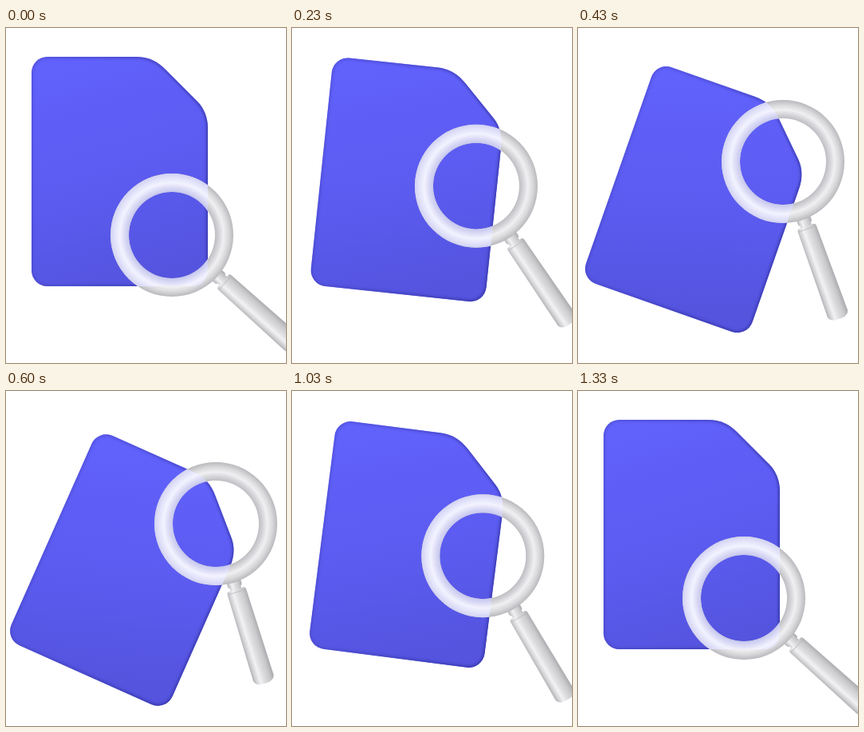
An HTML page for the animation above (1.53 s loop, 351 by 419 pixels).

```html
<!DOCTYPE html>
<html lang="en">
<head>
<meta charset="utf-8">
<title>Document search</title>
<style>
  html, body { margin: 0; width: 100%; height: 100%; overflow: hidden; background: #fff; }
  svg { display: block; width: 100%; height: 100%; }
</style>
</head>
<body>
<svg viewBox="0 0 351 419">
  <defs>
    <path id="sheet" d="M-90.5-143.5H20C36-143.5 47-138 57.5-127.5L97.5-87.5C106-79 110.5-67 110.5-54V123.5A20 20 0 0 1 90.5 143.5H-90.5A20 20 0 0 1-110.5 123.5V-123.5A20 20 0 0 1-90.5-143.5Z"/>
    <path id="ring" fill-rule="evenodd" d="M-77 0a77 77 0 1 1 154 0a77 77 0 1 1-154 0ZM-54 0a54 54 0 1 1 108 0a54 54 0 1 1-108 0Z"/>
    <clipPath id="inSheet"><use href="#sheet"/></clipPath>
    <clipPath id="overSheet"><use id="overlap" href="#sheet"/></clipPath>
    <filter id="soft" x="-10%" y="-10%" width="120%" height="120%"><feGaussianBlur stdDeviation="1.4"/></filter>
    <linearGradient id="blue" x1=".3" y1="0" x2=".55" y2="1">
      <stop offset="0" stop-color="#6161fc"/>
      <stop offset=".5" stop-color="#5c5cf2"/>
      <stop offset="1" stop-color="#5454df"/>
    </linearGradient>
    <linearGradient id="rim" x1="0" y1=".4" x2="1" y2=".6">
      <stop offset="0" stop-color="#4747c8" stop-opacity=".55"/>
      <stop offset="1" stop-color="#3c3cb4"/>
    </linearGradient>
    <radialGradient id="silver" gradientUnits="userSpaceOnUse" cx="0" cy="0" r="77">
      <stop offset=".70" stop-color="#bdbdc2"/>
      <stop offset=".76" stop-color="#d2d2d6"/>
      <stop offset=".84" stop-color="#f0f0f2"/>
      <stop offset=".92" stop-color="#d9d9dc"/>
      <stop offset="1" stop-color="#b9b9bd"/>
    </radialGradient>
    <radialGradient id="frost" gradientUnits="userSpaceOnUse" cx="0" cy="0" r="77">
      <stop offset=".70" stop-color="#c6c6ee"/>
      <stop offset=".77" stop-color="#dadaf5"/>
      <stop offset=".85" stop-color="#f3f3ff"/>
      <stop offset=".93" stop-color="#e2e2fa"/>
      <stop offset="1" stop-color="#d2d2f3"/>
    </radialGradient>
    <linearGradient id="metal" x1="0" y1="0" x2="0" y2="1">
      <stop offset="0" stop-color="#a9a9ad"/>
      <stop offset=".22" stop-color="#c9c9cc"/>
      <stop offset=".5" stop-color="#dfdfe2"/>
      <stop offset=".68" stop-color="#f2f2f4"/>
      <stop offset=".86" stop-color="#d3d3d6"/>
      <stop offset="1" stop-color="#b2b2b6"/>
    </linearGradient>
  </defs>
  <rect width="351" height="419" fill="#fff"/>
  <g id="doc">
    <use href="#sheet" fill="url(#blue)"/>
    <g clip-path="url(#inSheet)">
      <use href="#sheet" fill="none" stroke="url(#rim)" stroke-width="4.5" filter="url(#soft)"/>
    </g>
  </g>
  <g id="handle">
    <path d="M74-9H80Q83-9 83-7H88V7H83Q83 9 80 9H74Z" fill="url(#metal)"/>
    <path d="M89-12.3Q86-12 86-9V9Q86 12 89 12.3L202 13.4Q208 12 209 4V-4Q208-12 202-13.4Z" fill="url(#metal)"/>
    <path d="M89.500-11V11" stroke="#b5b5b9" stroke-opacity=".7"/>
  </g>
  <use class="lens" href="#ring" fill="url(#silver)"/>
  <g clip-path="url(#overSheet)">
    <use class="lens" href="#ring" fill="url(#frost)"/>
  </g>
</svg>
<script>
const LOOP = 1530;
const [doc, overlap, handle] = ['doc', 'overlap', 'handle'].map(id => document.getElementById(id));
const lenses = document.querySelectorAll('.lens');

const mix = (a, b, p) => a + (b - a) * p;
const clamp = v => Math.min(1, Math.max(0, v));

function bezier(x1, y1, x2, y2) {
  const at = (a, b, s) => 3 * (1 - s) ** 2 * s * a + 3 * (1 - s) * s * s * b + s ** 3;
  return u => {
    let low = 0, high = 1;
    for (let i = 0; i < 24; i++) {
      const mid = (low + high) / 2;
      if (at(x1, x2, mid) < u) low = mid; else high = mid;
    }
    return at(y1, y2, high);
  };
}

const docOut = bezier(.3, .1, .6, 1);
const lensOut = bezier(.2, .2, .45, 1);
const docBack = bezier(.25, .5, .35, 1);
const lensBack = bezier(.33, .4, .8, 1);

// 30 steps per second, with step times rounded to 10 ms
function stepAt(time) {
  let step = Math.floor(time * .03) + 1;
  while (Math.round(step * 10 / 3) * 10 > time) step--;
  return step;
}

function pose(step) {
  if (step < 26) {
    const u = clamp((step - 3) / 15), q = lensOut(u);
    return { tilt: docOut(u), x: q, y: 1 - (1 - q) ** 2, turn: 1 - (1 - q) ** 1.12 };
  }
  const u = clamp((step - 26) / 14), q = 1 - lensBack(u);
  return { tilt: 1 - docBack(u), x: q, y: q, turn: q };
}

function draw(time) {
  const { tilt, x, y, turn } = pose(stepAt(time));
  const docX = 142.5 + 15.5 * tilt * (1.1 - .1 * tilt);
  const docY = 179.5 + 44.5 * tilt * (.89 + .11 * tilt);
  const docPlace = `translate(${docX} ${docY}) rotate(${24 * tilt})`;
  const lensPlace = `translate(${mix(208, 263, x)} ${mix(259, 166, y)})`;
  doc.setAttribute('transform', docPlace);
  overlap.setAttribute('transform', docPlace);
  lenses.forEach(lens => lens.setAttribute('transform', lensPlace));
  handle.setAttribute('transform', `${lensPlace} rotate(${mix(41.8, 72.8, turn)})`);
}

const start = performance.now();
function tick() {
  draw((performance.now() - start) % LOOP);
  requestAnimationFrame(tick);
}
tick();
</script>
</body>
</html>
```
